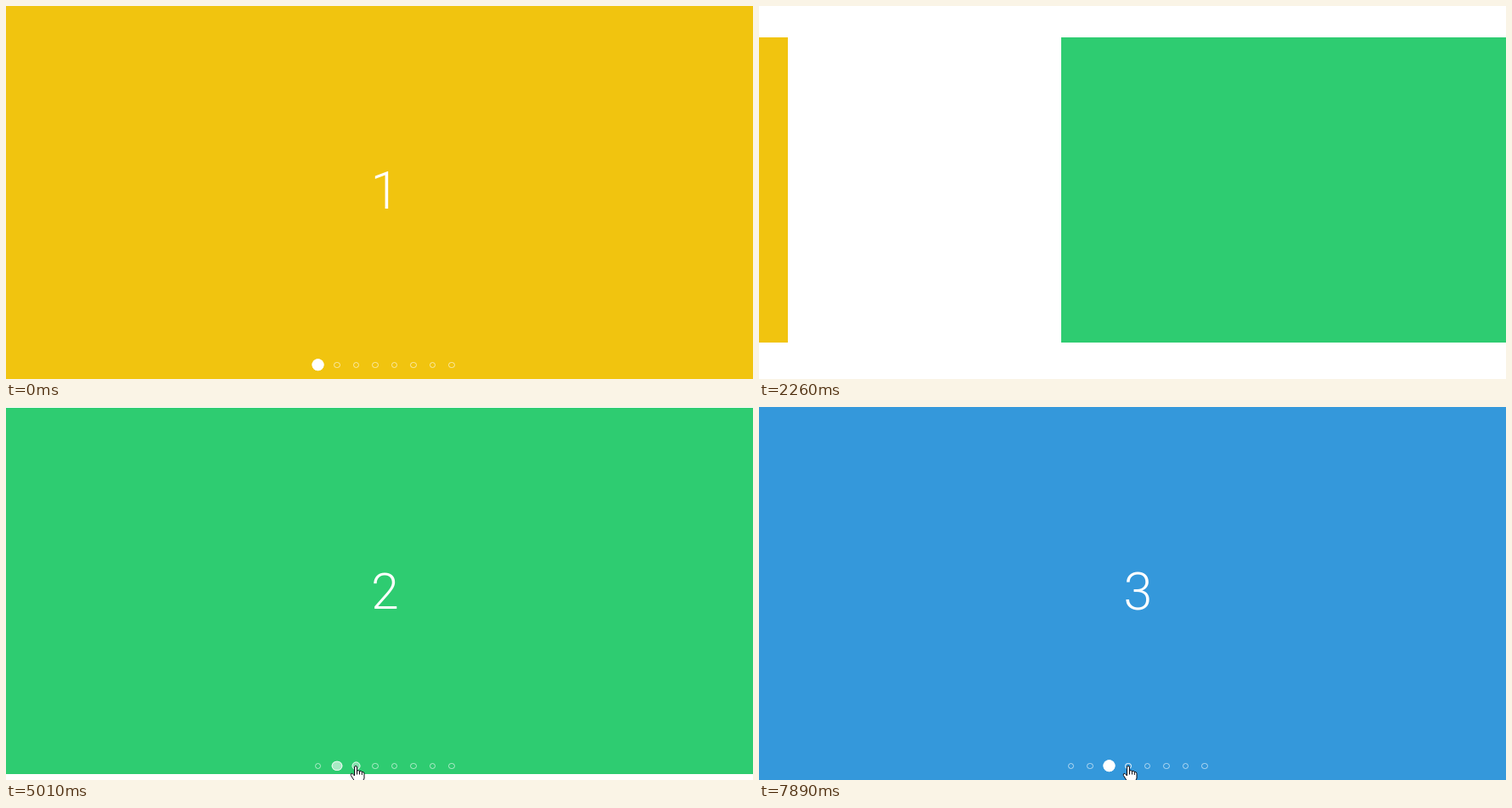
An HTML page for the animation above (8000 ms loop, 880 by 440 pixels).

```html
<!DOCTYPE html>
<html lang="en">
<head>
<meta charset="utf-8">
<title>Slider</title>
<style>
  html, body { margin: 0; width: 100%; height: 100%; overflow: hidden; background: #fff; }
  svg { display: block; width: 880px; height: 440px; }
  text { font: 300 61px Roboto, "Open Sans", sans-serif; fill: #fff; text-anchor: middle; }
</style>
</head>
<body>
<svg id="stage" viewBox="0 0 880 440"></svg>
<script>
const LOOP = 8000;
const CX = 446, CY = 217, W = 1610, H = 450;
const SMALL = 0.8;
const COLORS = ['#f1c40f', '#2ecc71', '#3498db'];
const DOTS = 8, DOT_Y = 423.5;
const BELOW = 446;

// Each click runs the same sequence: delay and length of every phase
const CLICKS = [1423, 4935];
const SHRINK = [0, 480], MOVE = [657, 1035], GROW = [1817, 390], SWAP = [0, 300];

// The pointer rises to a resting place beside a dot, lines up with it, then touches it
const VISITS = [
  { dot: 1, dx: 15, rest: 419, enter: [330, 150], aim: [630, 90], touch: [930, 150] },
  { dot: 2, dx: 1, rest: 428, enter: [3780, 400], aim: [4480, 120], touch: [4480, 230] },
  { dot: 3, dx: -2, rest: 426, enter: [7680, 120], aim: [7800, 90], touch: [7800, 90] }
];

const stage = document.getElementById('stage');

function add(parent, tag, attrs) {
  const el = document.createElementNS('http://www.w3.org/2000/svg', tag);
  set(el, attrs);
  parent.appendChild(el);
  return el;
}
function set(el, attrs) {
  for (const key in attrs) el.setAttribute(key, attrs[key]);
}

const slides = COLORS.map((fill, i) => {
  const g = add(stage, 'g', {});
  add(g, 'rect', {
    x: -W / 2, y: -H / 2, width: W, height: H, fill, 'shape-rendering': 'crispEdges'
  });
  add(g, 'text', { x: 0.5, y: 21.5 }).textContent = i + 1;
  return g;
});

const dots = Array.from({ length: DOTS }, () => ({
  disc: add(stage, 'rect', { fill: '#fff' }),
  ring: add(stage, 'rect', { fill: 'none', stroke: '#fff' })
}));

const ink = { fill: '#fff', stroke: '#0a0a14', 'stroke-width': 1, 'stroke-linejoin': 'round' };
const arrow = add(stage, 'path', { ...ink, d: 'M.5 .5V16.5L4.2 13 7 18.8 9.3 17.8 6.7 12.1H11.6Z' });
const hand = add(stage, 'path', {
  ...ink,
  d: 'M-1.5 12V2Q-1.5 .5 0 .5T1.5 2V6Q3.2 5.2 4.5 6.5 6.2 6 7.3 7.3 10 7.2 10 9.5V15L8.5 18V21.5H-1V19' +
     'L-5.7 11.5Q-6.3 9.1-4.1 9.3ZM1.5 6V10.5M4.5 6.5V10.5M7.3 7.3V11'
});

const clamp = v => Math.min(1, Math.max(0, v));
const lerp = (a, b, k) => a + (b - a) * k;
const phase = (t, [start, length]) => clamp((t - start) / length);
const dotX = i => 367.5 + 22.5 * i;
// Adds up one eased phase over all clicks
const total = (t, span, curve) => CLICKS.reduce((sum, c) => sum + curve(phase(t - c, span)), 0);

// The standard "ease" curve: cubic-bezier(.25, .1, .25, 1)
function ease(x) {
  const curve = (u, a, b) => 3 * (1 - u) * (1 - u) * u * a + 3 * (1 - u) * u * u * b + u * u * u;
  let lo = 0, hi = 1;
  for (let i = 0; i < 24; i++) {
    const mid = (lo + hi) / 2;
    if (curve(mid, 0.25, 0.25) < x) lo = mid; else hi = mid;
  }
  return curve((lo + hi) / 2, 0.1, 1);
}

// Decelerates past the end and settles back
function backOut(x) {
  const c = 1.83, u = 1 - x;
  return 1 + c * u * u - (c + 1) * u * u * u;
}

function drawSlides(t) {
  const scale = 1 - (1 - SMALL) * (total(t, SHRINK, ease) - total(t, GROW, ease));
  const pos = total(t, MOVE, backOut);
  slides.forEach((g, i) =>
    set(g, { transform: `translate(${CX + (i - pos) * W} ${CY}) scale(${scale})` }));
}

function isHovered(t, i) {
  return VISITS.some((v, n) => v.dot === i && t >= v.touch[0] && t < (CLICKS[n] ?? LOOP));
}

function drawDots(t) {
  const current = total(t, SWAP, ease);
  dots.forEach(({ disc, ring }, i) => {
    const on = clamp(1 - Math.abs(i - current));
    const w = (i % 2 ? 8 : 7) * (1 + on), h = 7 * (1 + on);
    const x = dotX(i) - w / 2, y = DOT_Y - h / 2 - 0.25 * on;
    set(disc, { x, y, width: w, height: h, rx: h / 2, 'fill-opacity': on });
    set(ring, {
      x: x + 0.5, y: y + 0.5, width: w - 1, height: h - 1, rx: (h - 1) / 2,
      'stroke-opacity': isHovered(t, i) ? 1 : 0.6 + 0.4 * on
    });
  });
}

function drawPointer(t) {
  const n = VISITS.findLastIndex(v => t >= v.enter[0]);
  const v = VISITS[Math.max(0, n)];
  const leave = phase(t, [(CLICKS[n] ?? LOOP) + 135, 170]);
  const x = dotX(v.dot) + v.dx * (1 - phase(t, v.aim));
  const risen = lerp(BELOW, v.rest, phase(t, v.enter));
  const y = lerp(lerp(risen, 423, phase(t, v.touch)), BELOW, leave);
  const transform = `translate(${Math.floor(x)} ${Math.round(y)})`;
  const touching = t >= v.touch[0];
  const shown = n >= 0 && leave < 1;
  set(arrow, { transform, visibility: shown && !touching ? 'visible' : 'hidden' });
  set(hand, { transform, visibility: shown && touching ? 'visible' : 'hidden' });
}

const start = performance.now();
function frame() {
  const t = (performance.now() - start) % LOOP;
  drawSlides(t);
  drawDots(t);
  drawPointer(t);
  requestAnimationFrame(frame);
}
frame();
</script>
</body>
</html>
```
